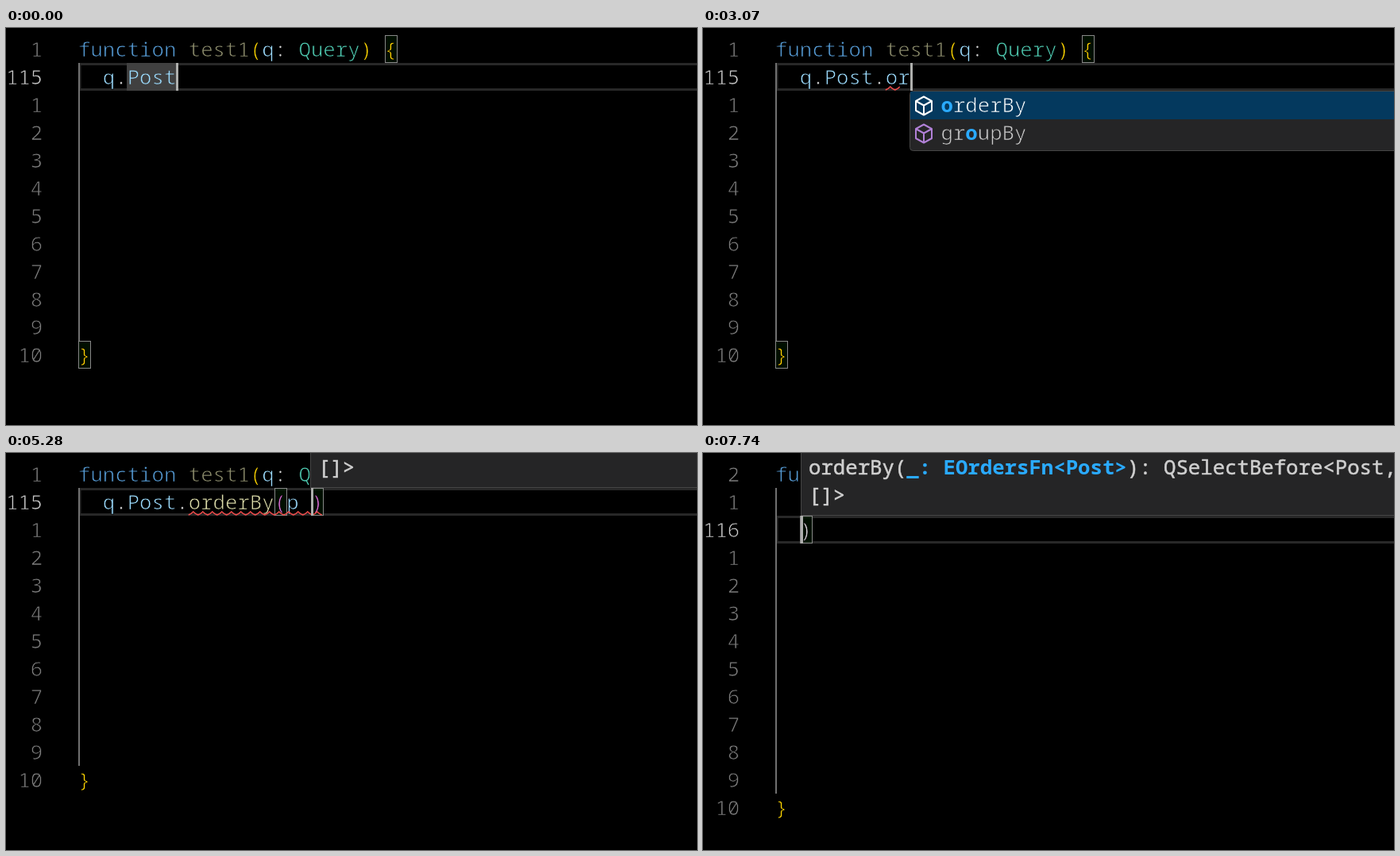
An HTML page that plays this animation: 870x500 px, repeating every 8000 ms.

```html
<!DOCTYPE html>
<html lang="en">
<head>
<meta charset="utf-8">
<title>Editor autocomplete</title>
<style>
  html, body { margin: 0; width: 100%; height: 100%; overflow: hidden; background: #000; }
  svg { display: block; width: 100%; height: 100%; }
  /* A thin outline in the background colour gives the light stroke weight. */
  text { font: 300 25.7px "Noto Sans Mono", "DejaVu Sans Mono", monospace; white-space: pre;
         font-variant-ligatures: none; stroke: #000; stroke-width: .75; }
  .marked { stroke: #404040; }
  .item { stroke: #252526; }
  .selected { stroke: #04395e; }
  .hint { stroke: #d0d0d0; stroke-width: .5; }
  .bold { font-weight: 700; fill: #2aaaff; stroke: none; }
  .icon { fill: none; stroke-width: 2; stroke-linejoin: round; }
</style>
</head>
<body>
<svg id="stage" viewBox="0 0 870 500"></svg>
<script>
const LOOP = 8000, CHAR = 15.42, ROW = 35, LEFT = 91, TOP = 9;
const color = {
  keyword: '#569cd6', func: '#dcdcaa', name: '#9cdcfe', type: '#4ec9b0',
  plain: '#d4d4d4', gold: '#ffd700', pink: '#da70d6', number: '#7c7c7c', error: '#f14c4c'
};
const iconColor = { method: '#b180d7', variable: '#75beff', keyword: '#cccccc' };

const methods = names => names.split(' ').map(name => ['method', name]);
const queryItems = methods('delete groupBy insert orderBy select update where');
const matchItems = methods('orderBy groupBy');
const globalItems = [
  ['keyword', 'package'], ...methods('parseFloat parseInt'),
  ['variable', 'performance'], ['variable', 'process'], ['variable', 'parentPort'],
  ...methods('parse parse parse parse parse parse')
];

// Each step changes only the listed properties of the editor state.
const steps = [
  [0, { tail: '', args: null, caret: true, marked: true, braces: true, parens: false, called: false,
        items: null, query: '', squiggle: null, hint: false, testDim: true, argDim: false, newline: false }],
  [200, { caret: false }],
  [660, { caret: true }],
  [1190, { caret: false }],
  [1460, { caret: true, tail: '.', marked: false, items: queryItems }],
  [1790, { tail: '.o', items: matchItems, query: 'o' }],
  [2050, { squiggle: [9, 10] }],
  [2250, { caret: false }],
  [2800, { caret: true }],
  [3070, { tail: '.or' }],
  [3270, { tail: '.ord', items: matchItems.slice(0, 1), query: 'ord' }],
  [3540, { tail: '.orde', query: 'orde' }],
  [3610, { squiggle: [9, 12] }],
  [3740, { tail: '.order', query: 'order' }],
  [4140, { tail: '.orderBy', items: null }],
  [4210, { squiggle: null }],
  [4340, { args: '', braces: false }],
  [4410, { parens: true }],
  [4540, { called: true }],
  [4610, { hint: true }],
  [4740, { squiggle: [9, 18] }],
  [5080, { args: 'p', squiggle: [9, 19] }],
  [5150, { items: globalItems, query: 'p' }],
  [5280, { args: 'p ', items: null, squiggle: [9, 20] }],
  [5480, { args: 'p =', squiggle: [9, 21] }],
  [5880, { args: 'p =>', squiggle: [9, 22] }],
  [6010, { squiggle: [21, 22], testDim: false }],
  [6340, { args: 'p => ' }],
  [6410, { argDim: true }],
  [6610, { args: 'p => p', items: [['variable', 'p'], ...globalItems] }],
  [6880, { squiggle: null, testDim: true }],
  [6950, { argDim: false }],
  [7150, { caret: false }],
  [7280, { items: null }],
  [7610, { newline: true, caret: true, parens: false }],
  [7740, { parens: true }]
];

const colX = col => LEFT + col * CHAR;
const rowY = row => TOP + row * ROW;
const escape = s => s.replace(/&/g, '&amp;').replace(/</g, '&lt;').replace(/>/g, '&gt;');
const rect = (x, y, w, h, fill, extra = '') =>
  `<rect x="${x}" y="${y}" width="${w}" height="${h}" fill="${fill}" ${extra}/>`;
const path = (d, stroke, width) => `<path d="${d}" fill="none" stroke="${stroke}" stroke-width="${width}"/>`;
const textAt = (x, y, content, fill, extra = '') =>
  `<text x="${x}" y="${y}" fill="${fill}" ${extra}>${content}</text>`;
const code = (col, row, s, fill, extra) => textAt(colX(col), rowY(row) + 27, escape(s), fill, extra);
const dim = on => on ? 'opacity=".64"' : '';
const bracketBox = (col, row) =>
  rect(Math.round(colX(col)) + .5, rowY(row) + .5, 15, 34, '#001a00', 'fill-opacity=".6" stroke="#888"');

function drawIcon(kind, x, y, selected) {
  const stroke = selected ? '#fff' : iconColor[kind];
  const shape = {
    method: 'M0-11.5L10-6V6L0 11.5L-10 6V-6ZM-10-6L0-.5L10-6M0-.5V11.5',
    variable: 'M-7-7H-11V7H-7M7-7H11V7H7M-6-1L2-5L6-2V2L-2 5L-6 2ZM-6-1L-2 1.5L6-2M-2 1.5V5',
    keyword: 'M-11-9H0V-5H-11ZM4-8H11M-12-1H-3M1-1H12M-12 4H4M8 4H12M-12 9H7'
  }[kind];
  return `<path class="icon" d="${shape}" stroke="${stroke}" transform="translate(${x} ${y})"/>`;
}

function drawList(items, query, x) {
  const top = rowY(2);
  let out = rect(x + .5, top + .5, 900, items.length * ROW + 5, '#252526', 'rx="4" stroke="#454545"');
  out += rect(x + 1, top + 1, 900, ROW, '#04395e');
  items.forEach(([kind, name], i) => {
    const mid = top + 19 + i * ROW, at = name.indexOf(query), end = at + query.length;
    const label = name.slice(0, at) + `<tspan class="bold">${query}</tspan>` + name.slice(end);
    out += drawIcon(kind, x + 18, mid, i === 0);
    out += textAt(x + 39.5, mid + 8, label, i ? '#ccc' : '#fff', `class="${i ? 'item' : 'selected'}"`);
  });
  return out;
}

function drawHint(x, bottom) {
  const first = 'orderBy(<tspan class="bold">_: EOrdersFn&lt;Post&gt;</tspan>): QSelectBefore&lt;Post,';
  return rect(x + .5, bottom - 100.5, 900, 100, '#252526', 'stroke="#454545"') +
    textAt(x + 10, bottom - 52, first, '#d0d0d0', 'class="hint"') +
    textAt(x + 10, bottom - 17, '[]&gt;', '#d0d0d0', 'class="hint"');
}

function drawSquiggle([from, to]) {
  const end = colX(to) - 3;
  let d = `M${colX(from)} 78`;
  for (let x = colX(from); x < end; x += 12) {
    d += 'q3 -1 6 -4';
    if (x + 6 < end) d += 'q3 3 6 4';
  }
  return path(d, color.error, 1.6);
}

function drawArrow(col) {
  const x = colX(col), y = rowY(1) + 17.5;
  return path(`M${x + 2} ${y - 3.5}h25M${x + 2} ${y + 3.5}h25M${x + 21} ${y - 8}l8 8l-8 8`, color.keyword, 1.5);
}

function drawArguments(s) {
  let out = code(16, 1, '(', color.pink);
  if (s.args) out += code(17, 1, 'p', color.name, dim(s.argDim));
  if (s.args.includes('=>')) out += drawArrow(19);
  else if (s.args.includes('=')) out += code(19, 1, '=', color.plain);
  if (s.args.endsWith('> p')) out += code(22, 1, 'p', color.name);
  return out;
}

function draw(s) {
  const row = s.newline ? 2 : 1, last = 10 + row;
  const typed = s.args === null ? 8 + s.tail.length : 17 + s.args.length;
  const caretCol = s.newline ? 2 : typed;
  const caretX = colX(caretCol) + (s.newline ? 1.5 : 0);
  const popupX = Math.floor(caretX);

  let out = rect(93, rowY(row) + 1.5, 900, 32, 'none', 'stroke="#282828" stroke-width="3"');
  out += rect(91, 44, 2, (last - 1) * ROW, '#707070');
  if (s.marked) out += rect(152, 44, 62, 35, '#404040');
  if (s.braces) out += bracketBox(25, 0) + bracketBox(0, last);
  if (s.parens) out += (s.newline ? '' : bracketBox(16, 1)) + bracketBox(caretCol, row);

  for (let i = 0; i <= last; i++) {
    const label = i === row ? String(114 + row) : String(Math.abs(i - row));
    out += textAt((3 - label.length) * CHAR, rowY(i) + 27, label, i === row ? '#ccc' : color.number);
  }

  out += code(0, 0, 'function', color.keyword) + code(9, 0, 'test1', color.func, dim(s.testDim));
  out += code(14, 0, '(', color.gold) + code(15, 0, 'q', color.name) + code(16, 0, ':', color.plain);
  out += code(18, 0, 'Query', color.type) + code(23, 0, ')', color.gold) + code(25, 0, '{', color.gold);
  out += code(2, 1, 'q', color.name) + code(3, 1, '.', color.plain);
  out += code(4, 1, 'Post', color.name, s.marked ? 'class="marked"' : '');
  if (s.tail) out += code(8, 1, '.', color.plain) + code(9, 1, s.tail.slice(1), s.called ? color.func : color.name);
  if (s.args !== null) out += drawArguments(s) + code(caretCol, row, ')', s.newline ? color.plain : color.pink);
  out += code(0, last, '}', color.gold);

  if (s.squiggle) out += drawSquiggle(s.squiggle);
  if (s.hint) out += drawHint(popupX, rowY(row));
  if (s.items) out += drawList(s.items, s.query, popupX);
  if (s.caret) out += rect(Math.round(caretX), rowY(row), 3, ROW, '#aeafad');
  return out;
}

const stage = document.getElementById('stage');
const start = performance.now();
let shown = -1;

function tick() {
  const time = (performance.now() - start) % LOOP;
  const index = steps.filter(([at]) => at <= time).length - 1;
  if (index !== shown) {
    shown = index;
    stage.innerHTML = draw(Object.assign({}, ...steps.slice(0, index + 1).map(step => step[1])));
  }
  requestAnimationFrame(tick);
}
tick();
</script>
</body>
</html>
```
